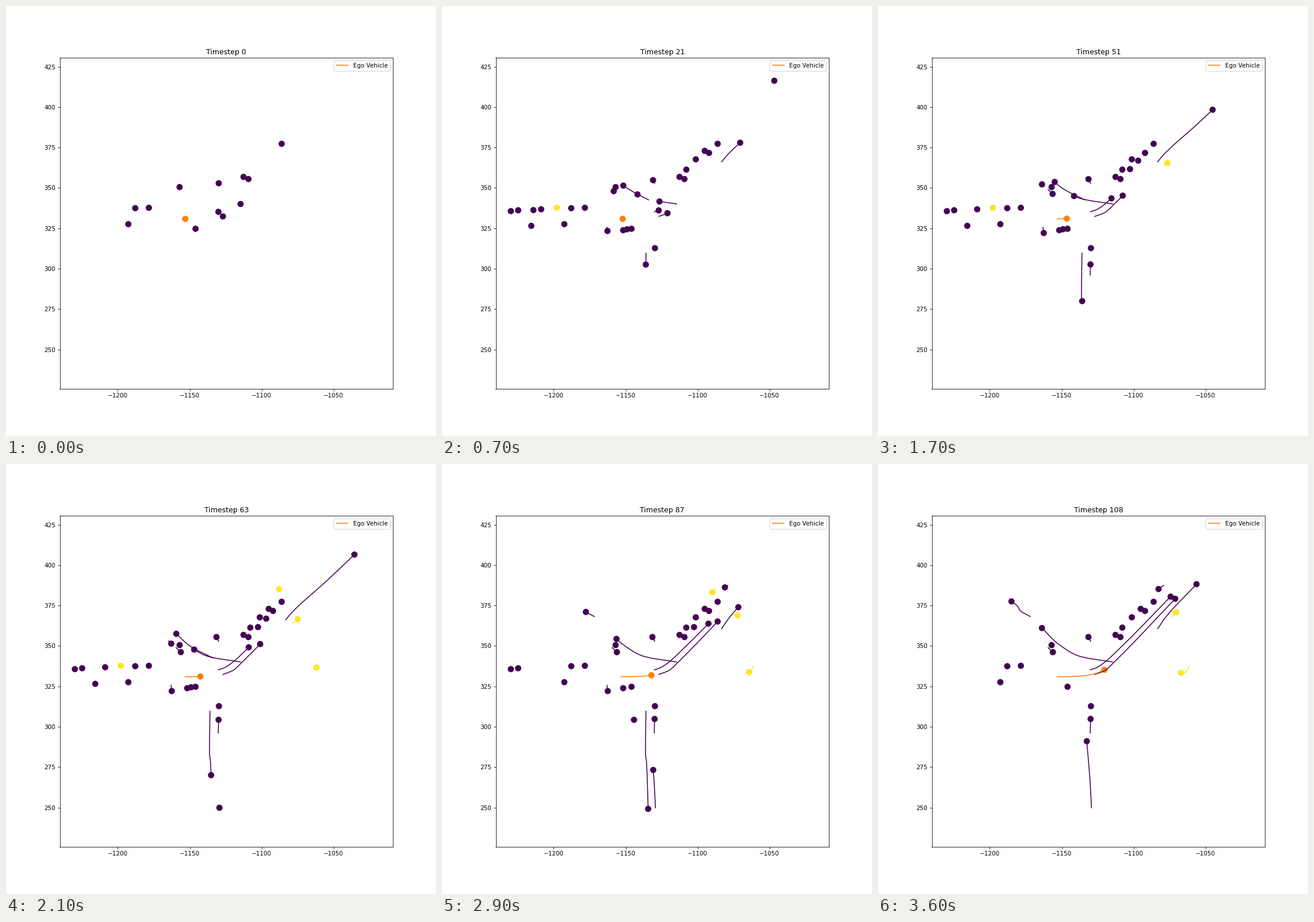
A matplotlib script for the animation above (3.7 s loop, 748 by 748 pixels).

```python
import numpy as np
import matplotlib.pyplot as plt
from matplotlib.animation import FuncAnimation

SIZE = 748
FRAMES, STEP = 37, 3
END = (FRAMES - 1) * STEP
DARK, YELLOW, ORANGE = "#440154", "#fde725", "#ff7f0e"
LEFT, RIGHT, BOTTOM, TOP = 0.125, 0.9, 0.11, 0.88
XLIM, YLIM = (-1240.35, -1008.7), (225.75, 430.6)

rng = np.random.default_rng(4)
plt.rcParams["font.family"] = "DejaVu Sans"
fig, ax = plt.subplots(figsize=(10, 10), dpi=SIZE / 10)
fig.subplots_adjust(left=LEFT, right=RIGHT, bottom=BOTTOM, top=TOP)
ax.set(xlim=XLIM, ylim=YLIM,
       xticks=range(-1200, -1049, 50), yticks=range(250, 426, 25))
title = ax.set_title("")
tracks = []


def to_map(x, y):
    """Stage pixels (y down) to map coordinates."""
    u = (x / SIZE - LEFT) / (RIGHT - LEFT)
    v = (1 - y / SIZE - BOTTOM) / (TOP - BOTTOM)
    return (XLIM[0] + u * (XLIM[1] - XLIM[0]),
            YLIM[0] + v * (YLIM[1] - YLIM[0]))


def curve(u, knots, values):
    """Monotone cubic curve through the knots."""
    h = np.diff(knots)
    d = np.diff(values) / h
    m = np.concatenate([d[:1], np.zeros(len(d) - 1), d[-1:]])
    for i, (a, b) in enumerate(zip(d[:-1], d[1:]), 1):
        if a * b > 0:
            m[i] = 2 * a * b / (a + b)
    k = np.clip(np.searchsorted(knots, u, side="right") - 1, 0, len(h) - 1)
    s = (u - knots[k]) / h[k]
    return ((1 + 2 * s) * (1 - s) ** 2 * values[k]
            + s * (1 - s) ** 2 * h[k] * m[k]
            + s * s * (3 - 2 * s) * values[k + 1]
            + s * s * (s - 1) * h[k] * m[k + 1])


def power(p):
    return lambda s: s ** p


def settle(s):
    return 1 - (1 - s) ** 6


def add(x, y, born, gone, color, label=None):
    line, = ax.plot([], [], color=color, lw=1.5, label=label)
    tracks.append((born, gone, *to_map(x, y), color, line))


def drive(*route, born=0, gone=END, ease=power(1), color=DARK, label=None):
    """Follow a smooth route from its first to its last point."""
    x, y = np.array(route, float).T
    dist = np.concatenate([[0], np.cumsum(np.hypot(np.diff(x), np.diff(y)))])
    u = dist[-1] * ease(np.linspace(0, 1, gone - born + 1))
    add(curve(u, dist, x), curve(u, dist, y), born, gone, color, label)


def park(x, y, born=None, gone=END, color=DARK):
    """Stand still; without a birth time, turn up early at random."""
    if born is None:
        born = STEP * int(rng.integers(1, 6))
    still = np.ones(gone - born + 1)
    add(x * still, y * still, born, gone, color)


# Parked from start to end
for x, y in ((413.2, 297.3), (421.7, 301), (302, 315), (224.8, 351.7),
             (248.5, 351), (212.8, 379.5), (329.7, 387.5), (479.5, 239.7)):
    park(x, y, 0)

# Queue in two lanes on the upper right road
for x, y in ((425, 284.6), (441.5, 266.7), (464.5, 255.6), (370.4, 421.2)):
    park(x, y)
park(438.4, 283.7, 27, 102)
park(452.6, 269, 27, 69)
for born, gone in ((9, 30), (57, END)):
    park(457, 252, born, gone)

# Row on the left, and others that drop out of sight
park(119.8, 356.8, gone=102)
park(132.5, 355.3, gone=87)
park(159, 355, gone=48)
park(172.5, 353.6, gone=84)
park(199.8, 351, gone=69, color=YELLOW)
park(155.3, 382.4, gone=84)
park(315.2, 390, gone=87)
park(321.8, 388.4, gone=69)
park(334, 445, 72, 102)

# Rolling to a stop
drive((370, 308.3), (366, 301), ease=settle)
drive((287, 385), (288.3, 395), born=9, gone=87, ease=settle)
drive((296, 319.5), (304.2, 327.3), born=15, ease=settle)
drive((369.2, 468), (369.8, 443.5), born=36, ease=settle)

# Through the junction, up and to the left
drive((408, 344.4), (352, 334.8), (313.6, 313), (285.2, 285.4),
      ease=power(0.95))
drive((359.5, 337.3), (319.2, 316), (295.9, 295), (276.5, 277.5),
      born=6, gone=84, ease=power(0.95))
drive((337, 326), (315.2, 312.3), (294, 295), born=3, gone=48, ease=power(0.8))
drive((282.6, 307.6), (288.5, 313.6), born=36, gone=69)
drive((264.8, 265.3), (247.5, 255), (242.7, 247.2), (232.2, 239),
      born=78, ease=power(0.8))

# Along the upper right road
drive((369.5, 358), (379.5, 354.5), (390, 348.2), (423.7, 317.5), (509, 230.7),
      ease=power(1.95))
drive((377.3, 366), (395, 359), (409.4, 346), (517, 234.4), ease=power(1.53))
drive((486.5, 271), (497, 258.5), (557, 204), (647.5, 118),
      born=6, gone=84, ease=power(0.95))
drive((578, 130), (534, 173), born=21, gone=48)
drive((486.5, 286.5), (500.8, 266), (554, 209), born=69)
drive((497, 211.2), (488, 217.5), born=75, ease=power(0.6))

# Along the lower road
drive((354.8, 430), (354, 503), (355.8, 519), (358, 579.4), (359.6, 638),
      born=9, gone=102, ease=power(1.15))
drive((371.3, 598), (369.2, 557), (363.2, 482.2), born=63, ease=power(0.9))

# Pedestrians
drive((498.5, 277), (509.5, 268.5), born=36, gone=69, color=YELLOW)
drive((511.5, 266.5), (518.7, 257.8), born=75, color=YELLOW)
drive((476.5, 216), (470, 223.5), born=60, gone=87, ease=power(0.7),
      color=YELLOW)
drive((541, 352), (536.7, 360.2), (531.5, 363.2), (526.9, 363.2),
      born=60, ease=power(0.8), color=YELLOW)

drive((311.8, 370.3), (349.6, 369.1), (375.2, 365.4), (393.8, 358),
      ease=power(2.15), color=ORANGE, label="Ego Vehicle")

dots = ax.scatter([], [], s=80, linewidths=1.5, zorder=1)
ax.legend(loc="upper right")


def update(frame):
    t = frame * STEP
    spots, colors = [], []
    for born, gone, xs, ys, color, line in tracks:
        alive = born <= t <= gone
        n = t - born + 1 if alive else 0
        line.set_data(xs[:n], ys[:n])
        if alive:
            spots.append((xs[n - 1], ys[n - 1]))
            colors.append(color)
    dots.set_offsets(spots)
    dots.set_color(colors)
    title.set_text(f"Timestep {t}")
    return [dots, title]


anim = FuncAnimation(fig, update, frames=FRAMES, interval=100,
                     repeat=True, repeat_delay=0, blit=False)
plt.show()
```
